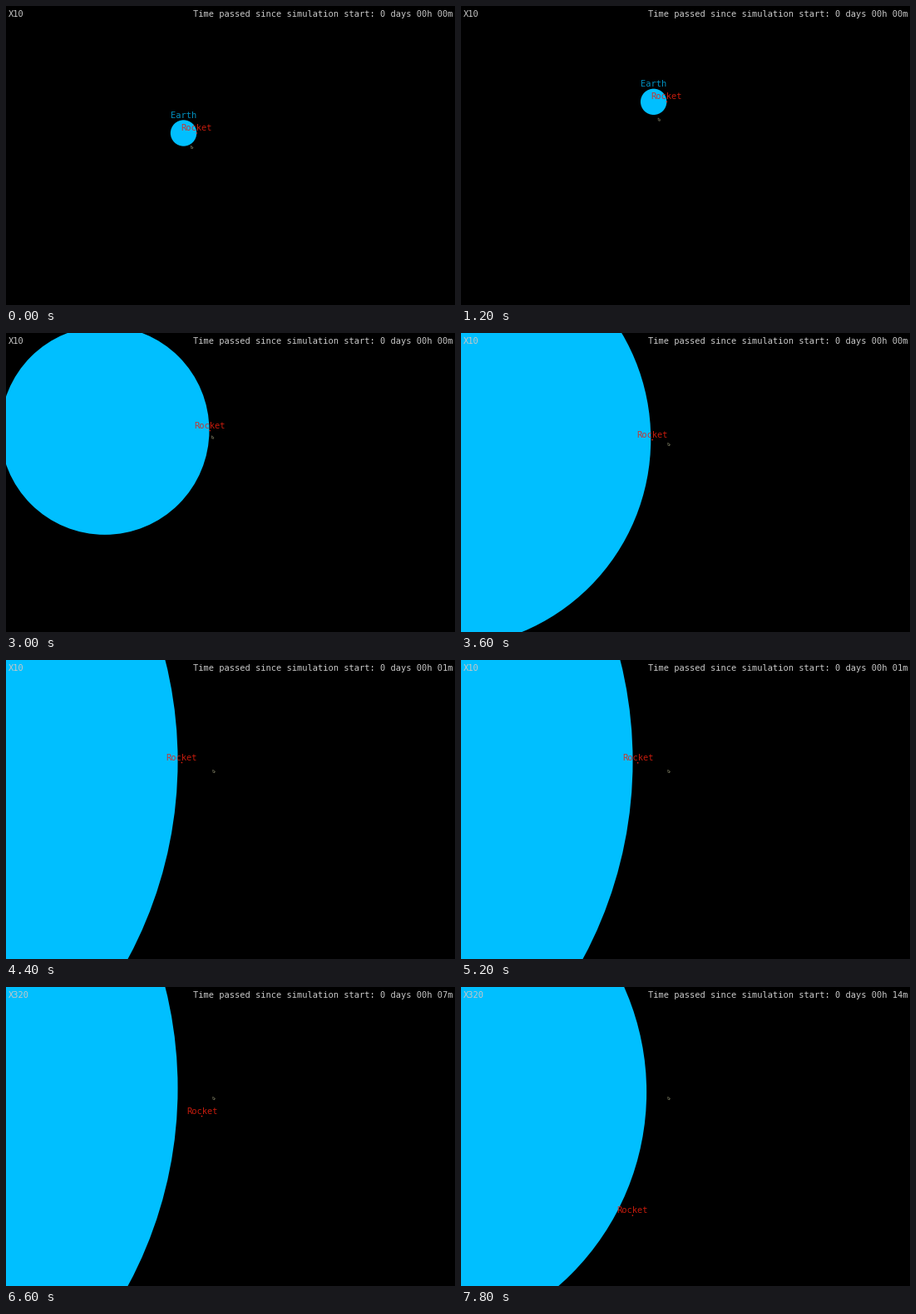
Write a matplotlib script that moves like this. It is 540 px wide and 360 px high and loops after 8000 ms.

```python
import matplotlib.pyplot as plt
import numpy as np
from matplotlib.animation import FuncAnimation
from matplotlib.patches import Circle, Polygon

W, H, DPI = 540, 360, 72
FRAMES, STEP = 40, 200
SKY, RED, GREY = "#00bfff", "#e8200f", "#c8c8c8"
CAP = 3.8       # half the height of a capital
RADIUS = 15.7   # Earth before zooming

# mouse places the view zooms about, and Earth's offset from them in radii
NEAR, FAR = np.array([247, 117]), np.array([250, 134])
NEAR_OFF, FAR_OFF = np.array([-0.978, -0.107]), np.array([-1.0865, -0.024])

fig = plt.figure(figsize=(W / DPI, H / DPI), dpi=DPI, facecolor="black")
ax = fig.add_axes([0, 0, 1, 1])
ax.set_xlim(0, W)
ax.set_ylim(H, 0)
ax.axis("off")


def label(text, color, ha, x=0, y=0, alpha=1):
    return ax.text(x, y, text, color=color, ha=ha, va="baseline", alpha=alpha,
                   zorder=4, clip_on=True, family="DejaVu Sans Mono", fontsize=10.4)


def ramp(x, start, end):
    return np.clip((x - start) / (end - start), 0, 1)


def mix(a, b, k):
    return a + (b - a) * k


def sim_seconds(n):
    return int(22 + 2 * n + 62 * max(n - 26.84, 0))


def earth_radius(n):
    doublings = (3 * ramp(n, 8, 11) + ramp(n, 16, 18) + ramp(n, 18, 21)
                 - 0.695 * ramp(n, 37, 39))
    return RADIUS * 2 ** doublings


def earth_center(n, r):
    hop = ramp(n, 14, 16)
    drag = np.array([-18.1, 37.7]) * (1 - ramp(n, 0, 6))
    return mix(NEAR, FAR, hop) + drag + mix(NEAR_OFF, FAR_OFF, hop) * r


def cursor_pos(n):
    approach = np.array([-23.5, 53]) * (1 - ramp(n, 0, 7) ** 3)
    return mix(NEAR, FAR, ramp(n, 14, 16)) + approach


def rocket_polar(t):
    """Distance in Earth radii and angle: ascent, sideways burn, coasting."""
    alt = 0.06 * (1 - np.exp(-((t - 22) / 140) ** 1.5))
    start, end, accel = 313, 589, 4.1e-6
    burn = np.clip(t, start, end) - start
    angle = 0.0134 * ramp(t, 22, 212)
    angle += accel * burn * (burn / 2 + max(t - end, 0))
    return 1 + alt, angle


earth = ax.add_patch(Circle((0, 0), 1, color=SKY, lw=0, zorder=1))
rocket = ax.add_patch(Circle((0, 0), 0.8, color=RED, lw=0, zorder=3))
ARROW = np.array([[-1.3, -1.8], [1.6, 0.6], [0.4, 0.8], [1.0, 1.9], [-1.1, 1.2]])
cursor = ax.add_patch(Polygon(ARROW, fc="black", ec="#75755c", lw=0.6, zorder=5))

earth_name = label("Earth", SKY, "center", alpha=0.75)
rocket_name = label("Rocket", RED, "center", alpha=0.85)
rate = label("", GREY, "left", 2.5, 13.4)
clock = label("", GREY, "right", 537.4, 13.4)


def draw(n):
    t = sim_seconds(n)
    r = earth_radius(n)
    cx, cy = earth_center(n, r)
    dist, angle = rocket_polar(t)
    rx = cx + r * dist * np.cos(angle)
    ry = cy + r * dist * np.sin(angle)

    earth.center = cx, cy
    earth.radius = r
    rocket.center = rx, ry
    cursor.set_xy(ARROW + cursor_pos(n))
    earth_name.set_position((cx, cy - r - 6.3 + CAP))
    rocket_name.set_position((rx, ry - 6.7 + CAP))
    rate.set_text("X10" if n < 27 else "X320")
    minutes = t // 60
    clock.set_text("Time passed since simulation start: "
                   f"{minutes // 1440} days {minutes // 60 % 24:02d}h {minutes % 60:02d}m")
    return earth, rocket, cursor, earth_name, rocket_name, rate, clock


anim = FuncAnimation(fig, draw, frames=FRAMES, interval=STEP, repeat=True,
                     repeat_delay=0, blit=False)
plt.show()
```
